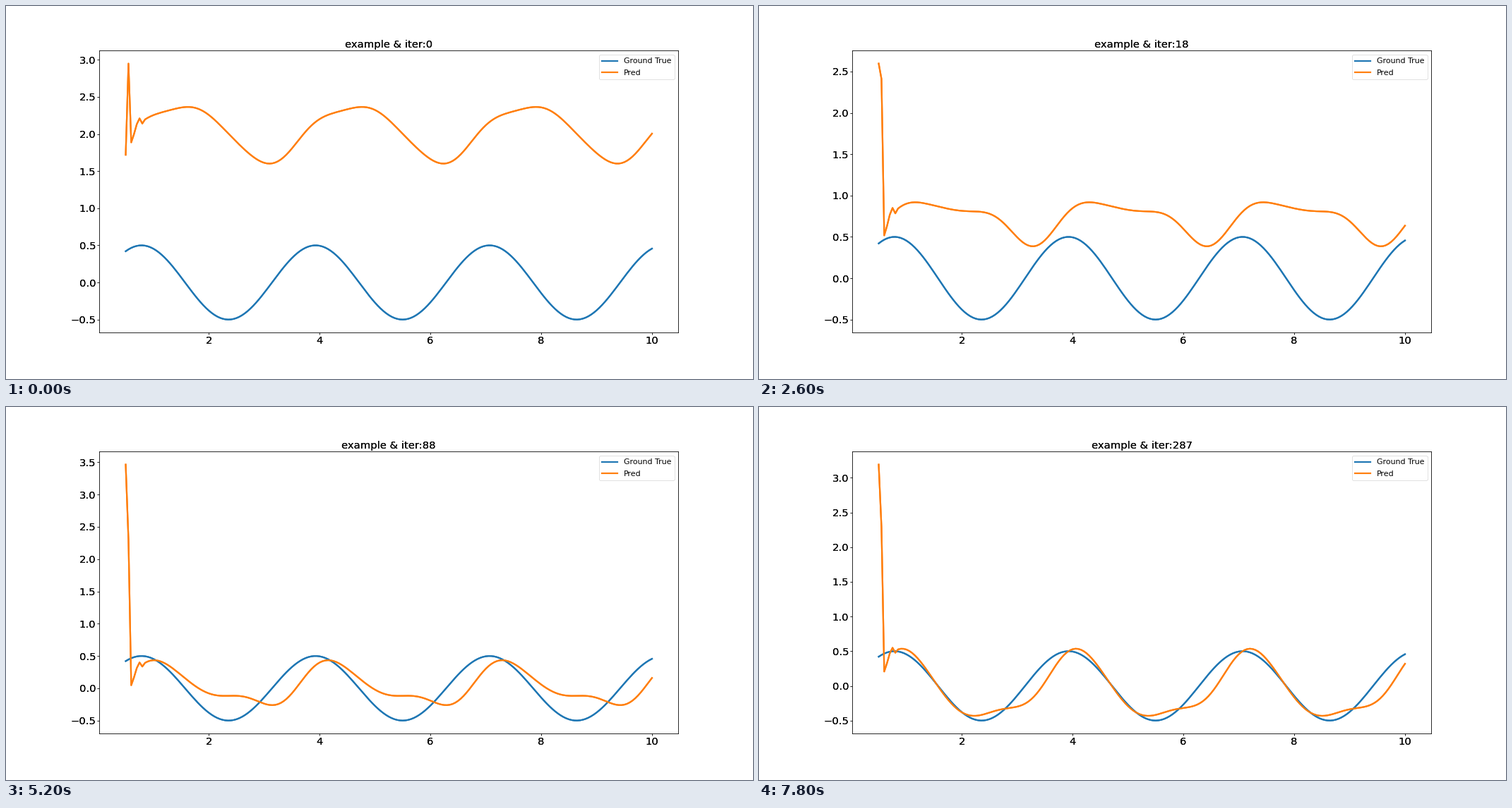
Animation, 1058 px wide and 529 px high, one loop 8 s. Source, as a matplotlib script:

```python
import numpy as np
import matplotlib.pyplot as plt
from matplotlib.animation import FuncAnimation

FRAMES, STEP_MS = 40, 200
BLUE, ORANGE = "#1f77b4", "#ff7f0e"

# The counter climbs one by one to eight, then geometrically between marks.
MARK_FRAMES = [8, 13, 17, 26, 34, 39]
MARK_ITERS = [8, 18, 30, 88, 175, 287]

# Ringing of the prediction right after its two opening samples.
RIPPLE = [-0.14, -0.07, 0.025, 0.07, -0.03]

x = np.linspace(0.5, 10, 191)


def iteration(n):
    if n <= MARK_FRAMES[0]:
        return n
    return round(float(np.exp(np.interp(n, MARK_FRAMES, np.log(MARK_ITERS)))))


def settled(s):
    """Periodic part: a sinking mean plus three slowly changing harmonics."""
    phase = 2 * x - 4
    mean = -0.046 + 2.08 * np.exp(-(1.96 * s + 1.76 * s**2 + 3.96 * s**3))
    cos1 = 0.2 - 0.53 / (1 + np.exp(-6.3 * (s - 0.7)))
    sin1 = -0.38 + 0.228 * np.exp(-((s - 0.36) / 0.31) ** 2)
    fade = np.exp(-(s / 0.24) ** 2)
    cos2 = -0.075 + 0.105 * fade
    sin2 = 0.098 - 0.052 * fade
    return (mean + cos1 * np.cos(phase) + sin1 * np.sin(phase)
            + cos2 * np.cos(2 * phase) + sin2 * np.sin(2 * phase)
            - 0.019 * np.sin(3 * phase))


def prediction(n):
    s = n / (FRAMES - 1)
    y = settled(s)
    y[0] = 2.59 + 0.93 * np.sin(3.65 * s - 1.21)
    y[1] = 2.29 + 0.66 * np.exp(-(s / 0.215) ** 1.2)
    y[2:2 + len(RIPPLE)] += RIPPLE
    return y


plt.rcParams["font.family"] = "DejaVu Sans"
fig = plt.figure(figsize=(20, 10), dpi=52.9, facecolor="white")

# Two identical layers give the text and lines their heavier weight.
layers = []
for depth in range(2):
    ax = fig.add_axes([0.125, 0.125, 0.775, 0.755], label=f"layer {depth}")
    ax.patch.set_visible(depth == 0)
    ax.tick_params(labelsize=20)
    ax.plot(x, 0.5 * np.sin(2 * x), lw=3, color=BLUE, label="Ground True")
    pred, = ax.plot(x, prediction(0), lw=3, color=ORANGE, label="Pred")
    layers.append((ax, pred, ax.set_title("", fontsize=20)))
ax.legend(loc="upper right", fontsize=15, labelspacing=0.56)


def draw(n):
    y = prediction(n)
    for ax, pred, title in layers:
        pred.set_ydata(y)
        title.set_text(f"example & iter:{iteration(n)}")
        ax.relim()
        ax.autoscale_view()


anim = FuncAnimation(fig, draw, frames=FRAMES, interval=STEP_MS,
                     init_func=lambda: draw(0), repeat=True, repeat_delay=0)
plt.show()
```
